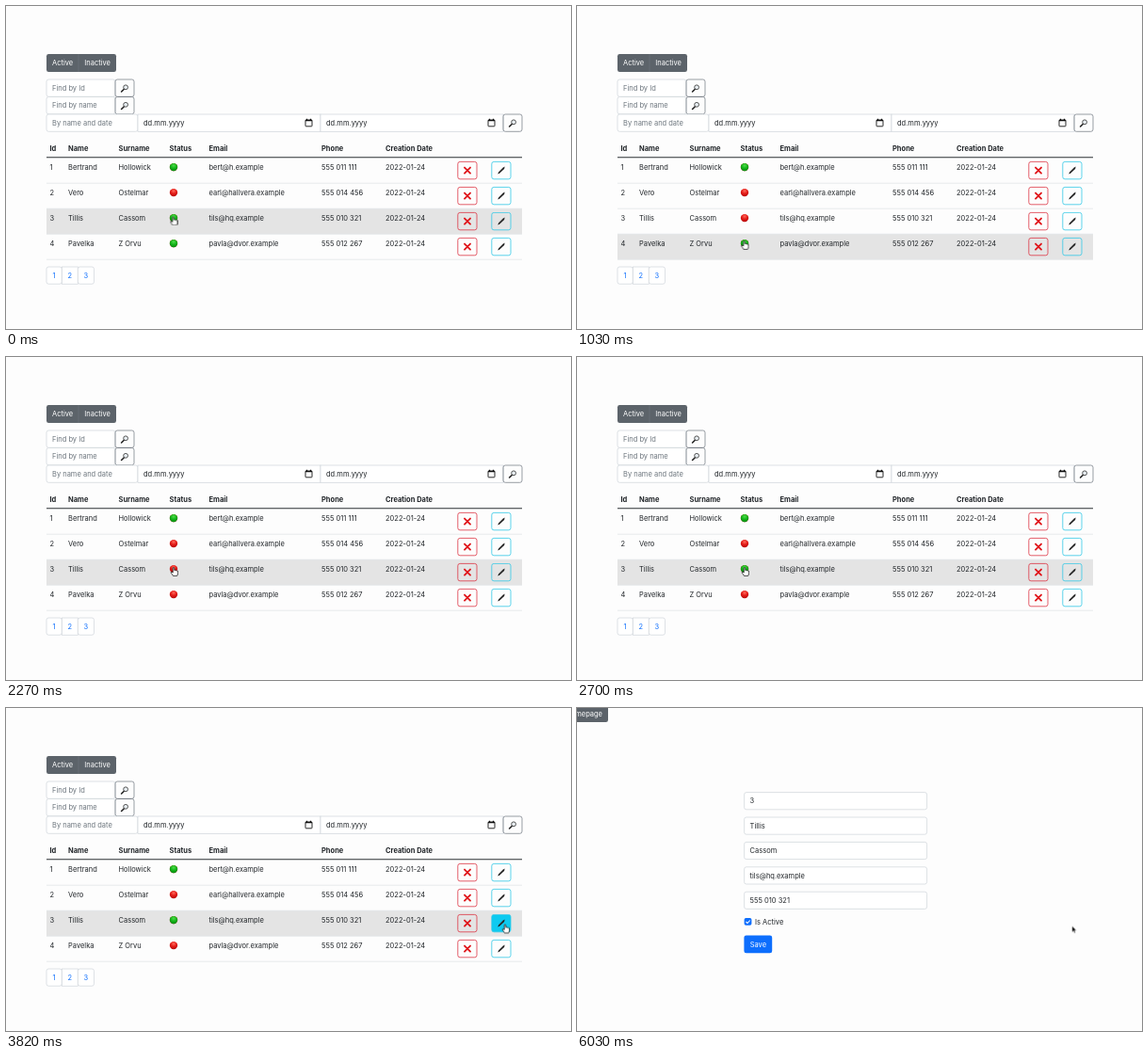
Write an HTML page that moves like this. It is 600 by 343 pixels and loops after 6.73 s.

```html
<!DOCTYPE html>
<html lang="en">
<head>
<meta charset="utf-8">
<title>User table</title>
<style>
  html, body { margin: 0; width: 100%; height: 100%; overflow: hidden; background: #fdfdfd; }
  svg { display: block; width: 100%; height: 100%; }
  text { font: 7.5px Inter, "Open Sans", sans-serif; fill: #212529; white-space: pre; }
  .head { font-weight: 700; }
  .hint { fill: #6c757d; }
  .light { fill: #fff; }
  .link { fill: #0d6efd; text-anchor: middle; }
  .end { text-anchor: end; }
  .box { fill: #fff; stroke: #ced4da; stroke-width: .7; }
  .tool { fill: none; stroke: #6c757d; stroke-width: .7; }
  .grey { fill: #5c636a; }
  .blue { fill: #0d6efd; }
  .rule { stroke: #dee2e6; stroke-width: .7; }

  .anim { animation: 6730ms infinite step-end; }
  #list { animation-name: list; }
  #form { animation-name: form; }
  #hover { animation-name: hover; }
  #lit2 { animation-name: third; }
  #lit3 { animation-name: fourth; }
  #press { animation-name: press; }
  #hand { animation-name: hand; }
  #arrow { animation-name: arrow; }
  #cursor { animation-name: move; animation-timing-function: ease-in-out; }

  @keyframes list { 0% { visibility: visible } 57.21%, 100% { visibility: hidden } }
  @keyframes form { 0% { visibility: hidden } 57.21%, 100% { visibility: visible } }
  @keyframes hover {
    0%, 25.93%, 100% { transform: translateY(0) }
    12.93% { transform: translateY(27px) }
  }
  @keyframes third { 0%, 37.15%, 100% { opacity: 1 } 5.94% { opacity: 0 } }
  @keyframes fourth { 0% { opacity: 1 } 17.83%, 100% { opacity: 0 } }
  @keyframes press { 0%, 57.21%, 100% { opacity: 0 } 52.9% { opacity: 1 } }
  @keyframes hand {
    0%, 13.82%, 27.49%, 52.9% { opacity: 1 }
    10.4%, 21.1%, 40.86%, 70.28%, 100% { opacity: 0 }
  }
  @keyframes arrow {
    0%, 13.82%, 27.49%, 43.83%, 52.9% { opacity: 0 }
    10.4%, 21.1%, 40.86%, 50.52%, 70.28%, 100% { opacity: 1 }
  }
  @keyframes move {
    0%, 10.4% { transform: translate(177.5px, 223.5px) }
    14.86%, 20.8% { transform: translate(177.5px, 249px) }
    25.71% { transform: translate(177.5px, 238px) }
    28.97%, 40.12% { transform: translate(178px, 223px) }
    55.7%, 73.85% { transform: translate(530px, 229.5px) }
    76.97%, 100% { transform: translate(525.7px, 231.5px) }
  }
</style>
</head>
<body>
<svg id="stage" viewBox="0 0 600 343">
  <defs>
    <radialGradient id="green" cx=".5" cy=".3" r=".7">
      <stop offset="0" stop-color="#4fdc4a"/><stop offset=".5" stop-color="#14b51a"/><stop offset="1" stop-color="#078a10"/>
    </radialGradient>
    <radialGradient id="red" cx=".5" cy=".3" r=".7">
      <stop offset="0" stop-color="#ff6a5c"/><stop offset=".5" stop-color="#e31b17"/><stop offset="1" stop-color="#b50a0c"/>
    </radialGradient>
    <g id="lens">
      <path d="M-.6 1-3.4 3.8" stroke="#222" stroke-width="1.6" stroke-linecap="round"/>
      <circle cx="1.1" cy="-.9" r="2.4" fill="#e8eef2" stroke="#444" stroke-width=".9"/>
    </g>
    <g id="calendar">
      <rect x="-3.5" y="-3" width="7" height="6.8" rx=".6" fill="none" stroke="#111" stroke-width=".9"/>
      <path d="M-3.5-2.3h7M-2-4.2v1.2M2-4.2v1.2" stroke="#111" stroke-width="1.3"/>
    </g>
    <path id="cross" d="M-3-3 3 3M3-3-3 3" stroke="#e0161b" stroke-width="1.9" stroke-linecap="round"/>
    <g id="pen">
      <path d="M-3.9 4-2.6 1.5 1.6-2.9 3.6-4 3.1-1.7-1.5 2.6Z" fill="#1c1c1c"/>
      <path d="M-1.9 1.6 1.8-2.2" stroke="#777" stroke-width=".4"/>
    </g>
  </defs>
</svg>
<script>
  const people = [
    ["Bertrand", "Hollowick", "bert@h.example", "555 011 111"],
    ["Vero", "Ostelmar", "earl@hallvera.example", "555 014 456"],
    ["Tillis", "Cassom", "tils@hq.example", "555 010 321"],
    ["Pavelka", "Z Orvu", "pavla@dvor.example", "555 012 267"]
  ];
  const heads = ["Id", "Name", "Surname", "Status", "Email", "Phone", "Creation Date"];
  const columns = [46.5, 66, 119.5, 173.5, 215.5, 335, 403];

  const text = (x, y, value, cls = "") => `<text x="${x}" y="${y}" class="${cls}">${value}</text>`;
  const rect = (x, y, w, h, cls, r = 2.3, extra = "") =>
    `<rect x="${x}" y="${y}" width="${w}" height="${h}" rx="${r}" class="${cls}" ${extra}/>`;
  const icon = (name, x, y) => `<use href="#${name}" x="${x}" y="${y}"/>`;
  const dot = (y, color, attrs = "") => `<circle cx="178" cy="${y}" r="4.2" fill="url(#${color})" ${attrs}/>`;
  const rule = y => `<path class="rule" d="M43 ${y}H548"/>`;

  function filters() {
    const search = (x, y) => rect(x, y, 20, 18.3, "tool") + icon("lens", x + 10, y + 9.2);
    const date = x => rect(x, 115, 194, 18.3, "box", 0) + text(x + 6, 126.8, "dd.mm.yyyy") + icon("calendar", x + 181.5, 124);
    return rect(43, 51, 74, 19, "grey") +
      `<path d="M77 51V70" stroke="#6c757d" stroke-width=".7"/>` +
      text(49, 63.2, "Active", "light") + text(83.3, 63.2, "Inactive", "light") +
      rect(43, 78, 73, 18.3, "box") + text(49, 89.8, "Find by Id", "hint") + search(116, 78) +
      rect(43, 96.5, 73, 18.3, "box") + text(49, 108.2, "Find by name", "hint") + search(116, 96.5) +
      rect(43, 115, 97, 18.3, "box") + text(49, 126.8, "By name and date", "hint") +
      date(140) + date(334) + search(528, 115);
  }

  function row([name, surname, email, phone], i) {
    const y = 173.8 + 27 * i, mid = 174.6 + 27 * i;
    const values = [i + 1, name, surname, "", email, phone, "2022-01-24"];
    const lit = i === 1 ? "" : dot(y - 2.7, "green", `id="lit${i}" class="anim"`);
    const press = i === 2 ? rect(515.8, mid - 9.2, 20.2, 18.4, "anim", 2.3, 'id="press" fill="#0dcaf0"') : "";
    return values.map((v, c) => text(columns[c], y, v)).join("") +
      dot(y - 2.7, "red") + lit +
      rect(479.8, mid - 9.2, 20.2, 18.4, "", 2.3, 'fill="none" stroke="#dc3545" stroke-width=".8"') +
      icon("cross", 490, mid) + press +
      rect(515.8, mid - 9.2, 20.2, 18.4, "", 2.3, 'fill="none" stroke="#31c8e6" stroke-width=".8"') +
      icon("pen", 526, mid) + rule(188.2 + 27 * i);
  }

  function listPage() {
    const pages = [[43, 16.3], [59.3, 17], [76.3, 17.2]].map(([x, w], i) =>
      rect(x, 277, w, 18.2, "box", i === 1 ? 0 : 2.3) + text(x + w / 2, 288.8, i + 1, "link"));
    return `<g id="list" class="anim">${filters()}` +
      rect(43, 215.2, 505, 27, "anim", 0, 'id="hover" fill="#e4e4e4"') +
      heads.map((h, c) => text(columns[c], 153.6, h, "head")).join("") +
      `<path d="M43 160.8H548" stroke="#2b2f33" stroke-width="1.1"/>` +
      people.map(row).join("") + pages.join("") + "</g>";
  }

  function formPage() {
    const fields = [3, ...people[2]].map((v, i) =>
      rect(177.6, 89.6 + 26.4 * i, 194, 18.2, "box") + text(183.6, 101.3 + 26.4 * i, v));
    return `<g id="form" class="anim">` +
      rect(-20, -5, 53, 20, "grey") + text(27, 8.6, "Homepage", "light end") + fields.join("") +
      rect(177.6, 223, 7.8, 7.8, "blue", 1.8) +
      `<path d="M179.5 227 181 228.5 183.7 225.5" fill="none" stroke="#fff" stroke-width="1.1"/>` +
      text(189, 229.7, "Is Active") +
      rect(177.4, 241.5, 29.8, 18.8, "blue") + text(183.7, 253.6, "Save", "light") + "</g>";
  }

  const cursor = `<g id="cursor" class="anim">
    <path id="hand" class="anim" fill="#fff" stroke="#111" stroke-width=".75" stroke-linejoin="round"
      d="M-.8.9Q0-.3.8.9V3.6Q1.6 2.8 2.2 3.8 3 3.1 3.5 4.1 4.6 3.7 4.6 5V6.8Q4.4 8 3.7 9.4H-.6Q-1.3 7.8-2.7 6.3-3.2 5.1-2 5L-.8 6Z"/>
    <path id="arrow" class="anim" fill="#000" stroke="#fff" stroke-width=".5"
      d="M0 0V6.5L1.5 5.2 2.5 7.6 3.6 7.1 2.6 4.8H4.6Z"/>
  </g>`;

  document.getElementById("stage").insertAdjacentHTML("beforeend", listPage() + formPage() + cursor);
</script>
</body>
</html>
```
